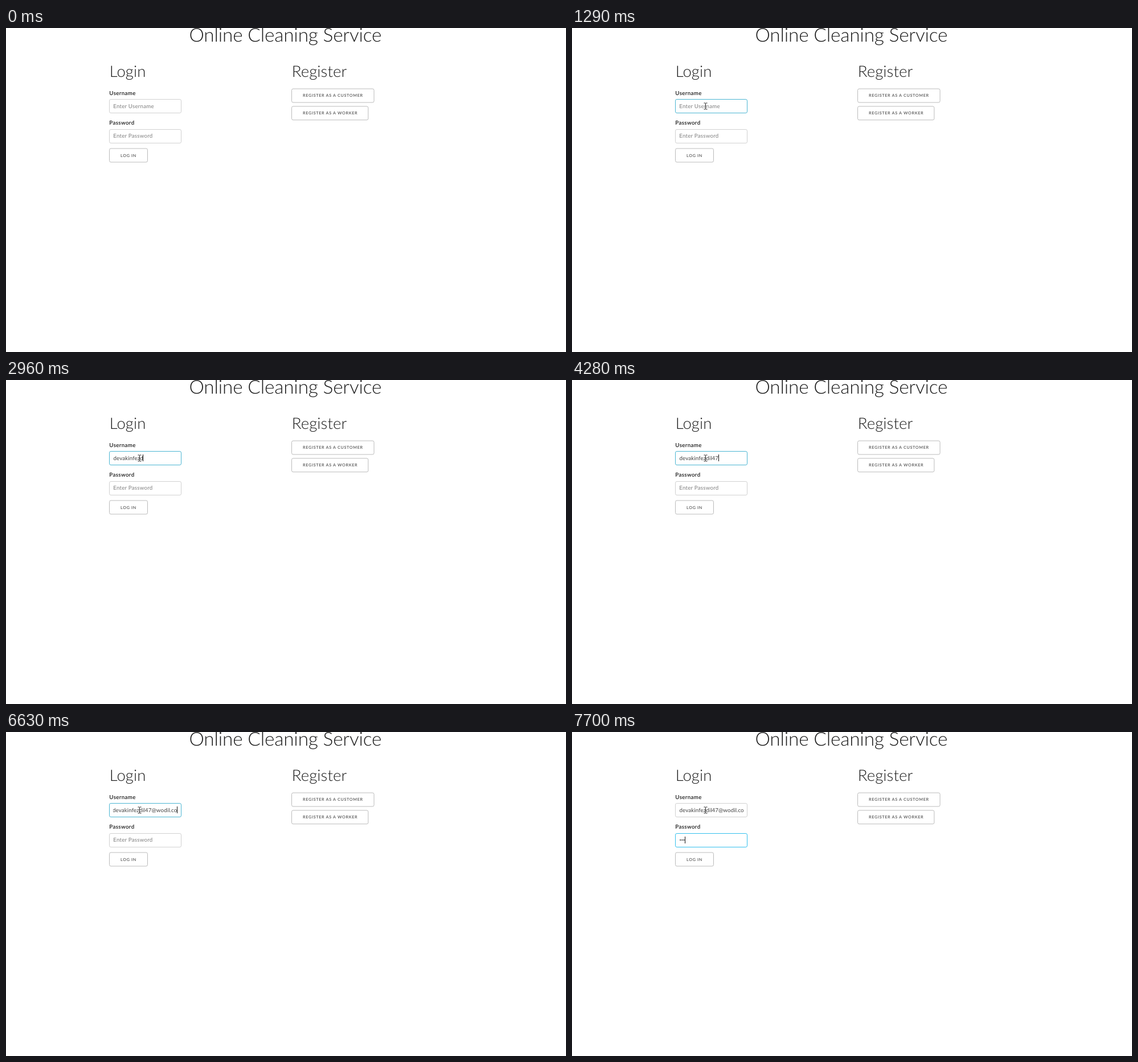
An HTML page for the animation above (8000 ms loop, 983 by 570 pixels).

```html
<!DOCTYPE html>
<html lang="en">
<head>
<meta charset="utf-8">
<title>Login form</title>
<style>
  html, body { margin: 0; width: 100%; height: 100%; overflow: hidden; background: #fff; }
  svg { display: block; width: 983px; height: 570px; }
  text { font-family: Raleway, Lato, sans-serif; fill: #1a1a1a; white-space: pre; text-rendering: geometricPrecision; }
  .title { font-size: 33.3px; font-weight: 300; letter-spacing: -.13px; }
  .head { font-size: 27.5px; font-weight: 300; letter-spacing: .15px; }
  .label { font-size: 9.75px; font-weight: 600; letter-spacing: .35px; }
  .hint { font-size: 9.75px; letter-spacing: .22px; fill: #808080; }
  .value { font-size: 9.75px; letter-spacing: .1px; fill: #444; }
  .btn { font-size: 7.15px; font-weight: 600; letter-spacing: .72px; fill: #555; }
  .box { fill: #fff; stroke: #d1d1d1; }
  .edge { stroke: #bbb; }
  .caret { fill: #111; }
</style>
</head>
<body>
<svg viewBox="0 0 983 570">
  <clipPath id="clip"><rect x="188" y="126" width="113.3" height="23"/></clipPath>

  <text class="title" x="321.5" y="24">Online Cleaning Service</text>
  <text class="head" x="181.7" y="86.3">Login</text>
  <text class="head" x="501.7" y="86.3">Register</text>

  <text class="label" x="181.3" y="117.5">Username</text>
  <rect class="box" id="userBox" x="181.5" y="125.5" width="126" height="24" rx="2.6"/>
  <text class="hint" id="userHint" x="188.2" y="140.6">Enter Username</text>
  <g clip-path="url(#clip)"><text class="value" id="user" x="188.5" y="140.6"></text></g>

  <text class="label" x="181.3" y="170.2">Password</text>
  <rect class="box" id="passBox" x="181.5" y="178.5" width="126" height="24" rx="2.6"/>
  <text class="hint" id="passHint" x="188.2" y="193.3">Enter Password</text>
  <g id="dots" fill="#333"></g>

  <rect class="box edge" x="181.5" y="212" width="67" height="24" rx="2.6"/>
  <text class="btn" x="201" y="226.7">LOG IN</text>
  <rect class="box edge" x="501.5" y="107" width="144.5" height="24" rx="2.6"/>
  <text class="btn" x="521" y="121.4">REGISTER AS A CUSTOMER</text>
  <rect class="box edge" x="501.5" y="137.8" width="134.3" height="24" rx="2.6"/>
  <text class="btn" x="521" y="152.2">REGISTER AS A WORKER</text>

  <rect class="caret" id="caret" width="1" height="12"/>
  <path id="arrow" d="M0 0V15.5L3.6 12.2 6 18 8.3 17 5.9 11.4H10.9Z" fill="#fff" stroke="#111" stroke-width=".9"/>
  <path id="beam" d="M-3 -5.5H-.8L0 -4.8.8 -5.5H3M0 -4.8V4.8M-3 5.5H-.8L0 4.8.8 5.5H3" fill="none" stroke="#222"/>
</svg>
<script>
const LOOP = 8000, BLINK = 530;
const FOCUS_USER = 760, FOCUS_PASS = 7040;
const LEFT = 188.5, RIGHT = 300.3;

// "<" is a backspace
const keys = "devakinfezdil47@woi<dil.com";
const keyTimes = [
  1690, 1890, 1950, 2150, 2220, 2340, 2460, 2590, 2700, 2810, 2960, 3090, 3230,
  4020, 4280, 4540, 5090, 5290, 5490, 5820, 5920, 6020, 6290, 6490, 6560, 6630, 6850
];
const dotTimes = [7370, 7500, 7700];

const $ = id => document.getElementById(id);
const show = (el, on) => el.setAttribute("visibility", on ? "visible" : "hidden");
const countUntil = (times, t) => times.filter(x => x <= t).length;

function typed(count) {
  let s = "";
  for (const k of keys.slice(0, count)) s = k === "<" ? s.slice(0, -1) : s + k;
  return s;
}

for (let i = 0; i < dotTimes.length; i++) {
  const dot = document.createElementNS("http://www.w3.org/2000/svg", "circle");
  dot.setAttribute("cx", 190.2 + 3.1 * i);
  dot.setAttribute("cy", 190);
  dot.setAttribute("r", 1.1);
  $("dots").append(dot);
}

function drawPointer(t) {
  const step = Math.min(9, Math.floor((t - 70) / 68.8));
  const e = (1 - Math.cos(Math.PI * Math.max(0, step) / 9)) / 2;
  const x = 944 - 709.5 * e;
  const y = 536 - 398.5 * e - 65 * Math.sin(Math.PI * e ** 4);
  const overInput = x > 181 && x < 308 && y > 125 && y < 150;
  $("arrow").setAttribute("transform", `translate(${x} ${y})`);
  $("beam").setAttribute("transform", `translate(${x} ${y})`);
  show($("arrow"), t >= 70 && !overInput);
  show($("beam"), t >= 70 && overInput);
}

function drawForm(t) {
  const inUser = t >= FOCUS_USER && t < FOCUS_PASS;
  const inPass = t >= FOCUS_PASS;
  const text = typed(countUntil(keyTimes, t));
  const dots = countUntil(dotTimes, t);

  $("userBox").style.stroke = inUser ? "#4bb5d2" : "";
  $("passBox").style.stroke = inPass ? "#33c0ee" : "";
  show($("userHint"), !text);
  show($("passHint"), !dots);

  const user = $("user");
  if (user.textContent !== text) user.textContent = text;
  const width = text ? user.getComputedTextLength() : 0;
  const shift = inUser ? Math.min(0, RIGHT - LEFT - width) : 0;
  user.setAttribute("x", LEFT + shift);
  [...$("dots").children].forEach((dot, i) => show(dot, i < dots));

  const caretX = inPass ? LEFT + 3.2 * dots : LEFT + shift + width;
  $("caret").setAttribute("x", Math.round(caretX - .5));
  $("caret").setAttribute("y", inPass ? 184 : 131);
  const stamps = [FOCUS_USER, ...keyTimes, FOCUS_PASS, ...dotTimes];
  const last = stamps[countUntil(stamps, t) - 1];
  show($("caret"), (inUser || inPass) && Math.floor((t - last) / BLINK) % 2 === 0);
}

const start = performance.now();
function frame() {
  const t = (performance.now() - start) % LOOP;
  drawForm(t);
  drawPointer(t);
  requestAnimationFrame(frame);
}
frame();
</script>
</body>
</html>
```
